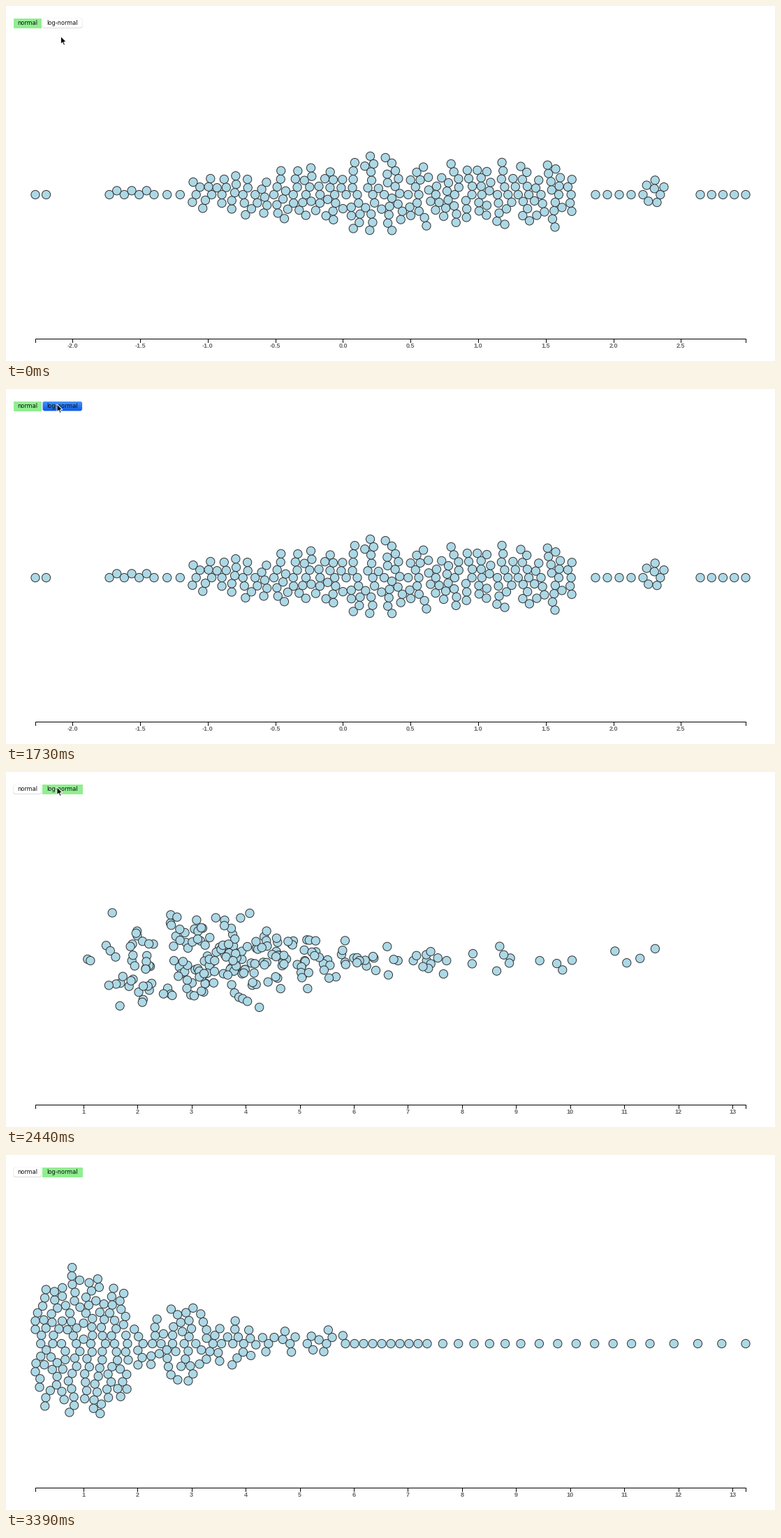
These frames come from a looping animation (1101 by 509 pixels, 4.84 s). A matplotlib script:

```python
import numpy as np
import matplotlib.pyplot as plt
from matplotlib.animation import FuncAnimation
from matplotlib.patches import FancyBboxPatch, Polygon, Rectangle

W, H, DPI = 1101, 509, 64
PT = 72 / DPI              # points per pixel
STEP, LOOP = 20, 4840
MID = 270.5                # centre line of the swarm
LEFT, RIGHT, AXIS_Y = 42, 1058.9, 476.9
COUNT, GAP = 245, 12.1     # dots, and the closest distance of two

PRESS, RELEASE, LEAVE = 1730, 1910, 3050
FIRST, TICK = 2080, 88.3   # the dots move in visible steps
START, DURATION = 1886, 1000

# Cumulative distributions: rank of a dot, its x
NORMAL = [(0, 42), (1, 57.5), (2, 148), (8, 212), (11, 268), (41, 375),
          (85, 490), (121, 560), (175, 690), (227, 810), (228, 844),
          (232, 912), (239, 942), (240, 994), (244, 1059)]
LOG_NORMAL = [(0, 42), (28, 72), (129, 172), (138, 203), (150, 235),
              (177, 283), (197, 347), (218, 486), (227, 603), (233, 737),
              (240, 922), (244, 1059)]

# Pointer tip: time, x, y
POINTER = [(0, 78.5, 43.5), (540, 78.5, 40), (630, 78, 33), (720, 77, 22),
           (810, 75, 13), (900, 74, 9.5), (1010, 73, 19.5), (1100, 73, 20.5),
           (1190, 73, 21.7)]
ARROW = np.array([(0, 0), (0, 11), (2.5, 8.7), (4.2, 12.8), (6, 12),
                  (4.3, 8.1), (7.8, 8)])

rng = np.random.default_rng(12)


def spread(knots):
    """Place the dots along x, with some scatter where they are dense."""
    ranks, xs = zip(*knots)
    x = np.interp(np.arange(COUNT), ranks, xs)
    dense = np.gradient(x) < 8
    return np.clip(x + dense * rng.uniform(-6, 6, COUNT), 42, 1059)


def swarm(x):
    """Give each dot the free height nearest to the centre line."""
    y = np.full(COUNT, MID)
    placed = []
    for i in rng.permutation(COUNT):
        near = [j for j in placed if abs(x[j] - x[i]) < GAP]
        dx, ny = x[near] - x[i], y[near]
        reach = np.sqrt(GAP**2 - dx**2)
        spots = np.concatenate([[MID], ny - reach, ny + reach])
        for spot in sorted(spots, key=lambda s: abs(s - MID)):
            if np.all(np.abs(spot - ny) > reach - 1e-6):
                y[i] = spot
                break
        placed.append(i)
    return np.column_stack([x, y])


def ease(t):
    t = min(max(t, 0), 1)
    return 4 * t**3 if t < 0.5 else 1 - 4 * (1 - t)**3


begin = swarm(spread(NORMAL))
end = rng.permutation(swarm(spread(LOG_NORMAL)))

fig = plt.figure(figsize=(W / DPI, H / DPI), dpi=DPI, facecolor="white")
ax = fig.add_axes([0, 0, 1, 1])
ax.axis("off")


def axis_marks(labels, x0, dx):
    parts = []
    for i, label in enumerate(labels):
        x = x0 + i * dx
        parts += ax.plot([x, x], [AXIS_Y, AXIS_Y + 5], color="black", lw=PT)
        parts.append(ax.text(x, 488, label, ha="center", va="center",
                             family="Liberation Sans", weight="bold",
                             size=9 * PT, color="#666666"))
    return parts


def rounded(x, y, w, h, **style):
    box = FancyBboxPatch((x, y), w, h, lw=0,
                         boxstyle="round,pad=0,rounding_size=3", **style)
    return ax.add_patch(box)


def button(x, w, label):
    """Return the plain and the selected look of a button."""
    plain = [rounded(x - 0.5, 17.8, w + 1, 14.2, fc="#dcdcdc"),
             rounded(x, 18, w, 13, fc="white")]
    chosen = [ax.add_patch(Rectangle((x - 0.5, 17.5), w + 1, 14,
                                     fc="#90ee90", lw=0))]
    ax.text(x + w / 2, 24.7, label, ha="center", va="center", zorder=5,
            family="DejaVu Sans", size=8.2 * PT, color="#111111")
    return plain, chosen


def show(parts, on):
    for p in parts:
        p.set_visible(on)


ax.plot([LEFT, LEFT, RIGHT, RIGHT],
        [AXIS_Y + 5, AXIS_Y, AXIS_Y, AXIS_Y + 5], color="black", lw=PT)
normal_marks = axis_marks([f"{v / 2:.1f}" for v in range(-4, 6)], 95.2, 96.8)
log_marks = axis_marks([str(v) for v in range(1, 14)], 110.6, 77.48)

normal_plain, normal_on = button(11, 39.5, "normal")
log_plain, log_on = button(52.5, 56.5, "log-normal")

pressed_shape = rounded(52.5, 17.7, 56.5, 13.6, fc="none")
top, bottom = np.array([0.27, 0.57, 0.98]), np.array([0.04, 0.35, 0.91])
shade = np.linspace(0, 1, 14)[:, None, None]
pressed = ax.imshow(top + (bottom - top) * shade, aspect="auto", zorder=4,
                    extent=(52, 109.5, 31.5, 17.5))
pressed.set_clip_path(pressed_shape)

dots = ax.scatter(*begin.T, s=(12.2 * PT)**2, fc="#add8e6", ec="#333333",
                  linewidths=[PT] * COUNT, zorder=3)
pointer = ax.add_patch(Polygon(ARROW, closed=True, fc="black", ec="white",
                               lw=0.9 * PT, zorder=6))
ax.set_xlim(0, W)
ax.set_ylim(H, 0)


def draw(i):
    t = i * STEP + STEP / 2
    moving = t >= FIRST
    shown = FIRST + (t - FIRST) // TICK * TICK
    p = ease((shown - START) / DURATION) if moving else 0
    dots.set_offsets(begin + (end - begin) * p)
    show(normal_marks, not moving)
    show(log_marks, moving)

    chosen = t >= RELEASE
    show(normal_plain, chosen)
    show(normal_on, not chosen)
    show(log_plain, not chosen)
    show(log_on, chosen)
    pressed.set_visible(PRESS <= t < RELEASE)

    _, x, y = [q for q in POINTER if q[0] <= t][-1]
    pointer.set_xy(ARROW + (x, y))
    pointer.set_visible(t < LEAVE)
    return []


anim = FuncAnimation(fig, draw, frames=LOOP // STEP, interval=STEP,
                     repeat=True, repeat_delay=0, blit=False)
plt.show()
```
